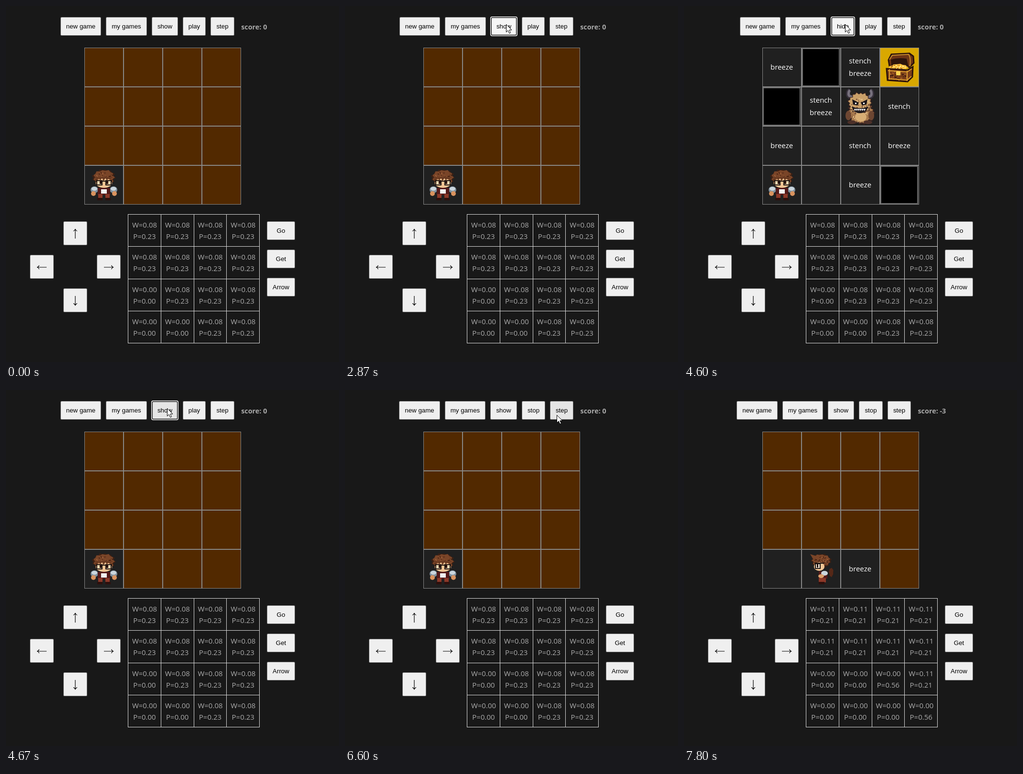
An HTML page with a canvas that plays this animation: 697 by 744 pixels, repeating every 8000 ms.

```html
<!DOCTYPE html>
<html lang="en">
<head>
<meta charset="utf-8">
<title>Cave game</title>
<style>
html, body { margin: 0; height: 100%; overflow: hidden; background: #181818; }
canvas { display: block; }
</style>
</head>
<body>
<canvas id="stage" width="697" height="744"></canvas>
<script>
const ctx = document.getElementById('stage').getContext('2d');
const LOOP = 8000, CELL = 82, BOARD_X = 164, BOARD_Y = 87;
const UI = '13.333px "Liberation Sans", Arial, sans-serif';
const BODY = '15px "Open Sans", "Noto Sans", sans-serif';
const BOLD = 'bold 14.4px "Open Sans", "Noto Sans", sans-serif';

// Drawing helpers
function rect(color, x, y, w, h) {
  ctx.fillStyle = color;
  ctx.fillRect(x, y, w, h);
}
function round(color, x, y, w, h, r) {
  ctx.fillStyle = color;
  ctx.beginPath();
  ctx.roundRect(x, y, w, h, r);
  ctx.fill();
}
function oval(color, x, y, rx, ry) {
  ctx.fillStyle = color;
  ctx.beginPath();
  ctx.ellipse(x, y, rx, ry, 0, 0, Math.PI * 2);
  ctx.fill();
}
function line(d, color, width) {
  ctx.strokeStyle = color;
  ctx.lineWidth = width;
  ctx.stroke(new Path2D(d));
}
function shape(color, d) {
  ctx.fillStyle = color;
  ctx.fill(new Path2D(d));
}
function text(s, x, y, font, color, align = 'center') {
  ctx.font = font;
  ctx.fillStyle = color;
  ctx.textAlign = align;
  ctx.fillText(s, x, y);
}
function at(x, y, paint) {
  ctx.save();
  ctx.translate(x, y);
  paint();
  ctx.restore();
}
function mirrored(axis, paint) {
  for (const side of [1, -1]) at(axis, 0, () => { ctx.scale(side, 1); paint(); });
}
// An oval with a shaggy edge
function fur(color, x, y, rx, ry, tufts) {
  ctx.fillStyle = color;
  ctx.beginPath();
  for (let i = 0; i < tufts * 2; i++) {
    const a = i * Math.PI / tufts, r = (i % 2 ? 0.86 : 1) + 0.05 * Math.sin(i * 5);
    ctx.lineTo(x + rx * r * Math.cos(a), y + ry * r * Math.sin(a));
  }
  ctx.fill();
}
// Seeded two-pixel dots scattered over an oval
function specks(colors, x, y, rx, ry, count) {
  let seed = 7;
  const random = () => (seed = seed * 16807 % 2147483647) / 2147483647;
  random();
  for (let i = 0; i < count; i++) {
    const a = random() * Math.PI * 2, r = Math.sqrt(random());
    rect(colors[i % colors.length], Math.round(x + rx * r * Math.cos(a)), Math.round(y + ry * r * Math.sin(a)), 2, 2);
  }
}

// Sprites, each in a cell
const HAIR = ['#5b2f1b', '#9a5d37', '#4a2413'];
function hair(x, y, rx, ry) {
  fur('#3d2013', x, y, rx, ry, 13);
  fur('#7a4528', x, y - 1, rx - 2, ry - 2, 11);
  specks(HAIR, x, y, rx - 6, ry - 5, 70);
}
function manFront() {
  hair(41, 26, 25, 18);
  oval('#f1c493', 41, 37, 17, 10);
  for (let i = -2; i < 3; i++) shape('#6a3b22', `M${36 + i * 7} 24h10l-6 ${9 - Math.abs(i)}z`);
  mirrored(41, () => {
    rect('#1b1412', 0, 32, 17, 2);
    rect('#1b1412', 3, 31, 13, 11);
    rect('#f8d8b0', 5, 33, 9, 7);
    rect('#2b1712', 5, 32, 4, 7);
    oval('#7f8f9c', 20, 51, 8, 7);
    oval('#cbd6dd', 20, 49, 6, 4);
    oval('#d9935f', 22, 59, 5, 5);
    rect('#541a1a', 0, 47, 13, 15);
    rect('#8c3828', 3, 60, 9, 9);
    rect('#2c100d', 3, 68, 11, 5);
  });
  rect('#f2f2f2', 35, 50, 12, 9);
}
function manSide() {
  fur('#552817', 20, 48, 5, 10, 7);
  hair(41, 24, 22, 15);
  shape('#7a4528', 'M48 15L64 10 56 23Z');
  oval('#f1c493', 45, 36, 11, 9);
  rect('#1b1412', 35, 28, 20, 2);
  rect('#1b1412', 42, 28, 12, 13);
  rect('#eee1cf', 44, 31, 8, 8);
  rect('#25150f', 47, 31, 3, 7);
  rect('#541a1a', 28, 46, 18, 15);
  oval('#cbd6dd', 34, 50, 7, 5);
  oval('#dda06b', 41, 56, 6, 4);
  rect('#8c3828', 31, 60, 15, 9);
  rect('#2c100d', 34, 68, 12, 5);
}
function monster() {
  mirrored(40.5, () => {
    line('M11 23Q26 22 25 14Q25 9 21 7', '#37313b', 9);
    line('M11 22Q25 21 24 14Q24 9 21 7', '#77717d', 5);
  });
  fur('#38221f', 42, 55, 31, 25, 19);
  fur('#a87a4e', 42, 54, 28, 22, 19);
  fur('#38221f', 40, 34, 26, 24, 17);
  fur('#c99f68', 40, 34, 24, 22, 17);
  specks(['#e5c28c', '#8a5f3d', '#6d4632'], 41, 48, 23, 26, 130);
  oval('#d8ae75', 42, 63, 12, 10);
  mirrored(40, () => {
    oval('#6d4632', 24, 60, 6, 10);
    oval('#4c3029', 17, 74, 9, 4);
    shape('#1b1519', 'M2 33L16 26 14 37 5 39Z');
    rect('#fff', 7, 33, 3, 3);
  });
  shape('#1b1519', 'M23 41Q40 48 58 41Q53 55 40 55Q28 55 23 41Z');
  for (let x = 28; x < 52; x += 4) shape('#fff', `M${x} 46h4l-2 5z`);
}
function chest() {
  const lid = 'M18 26L24 14 62 12 70 18 71 32 62 41 20 38Z';
  const box = 'M14 44L58 47 69 40 68 61 58 71 16 68Z';
  rect('#d9a800', 1, 1, 80, 80);
  shape('#6d3516', lid);
  line(lid, '#2b130b', 3);
  shape('#2d150c', 'M23 25Q38 20 56 23L60 40 24 38Z');
  line('M20 25L26 16 60 14Q65 20 63 39', '#c98d2c', 2);
  fur('#ffc23c', 39, 41, 21, 7, 9);
  specks(['#fff0a0', '#a8641b'], 39, 39, 17, 4, 24);
  shape('#7a3e18', box);
  line(box, '#2b130b', 3);
  specks(['#3f1d10', '#a9642b'], 37, 58, 19, 9, 60);
  line('M17 48L57 51 67 44M18 65L57 68 66 60M20 45V67M57 48V70', '#d99c31', 2);
  round('#ffd451', 34, 49, 9, 9, 2);
}

// The cave: signs follow from what lies in the neighbouring cells
const PITS = [[0, 1], [1, 0], [3, 3]], MONSTER = [1, 2], CHEST = [0, 3];
const gap = (a, b) => Math.abs(a[0] - b[0]) + Math.abs(a[1] - b[1]);

function contents(cell) {
  if (PITS.some(p => !gap(p, cell))) {
    rect('#6a6a6a', 1, 1, 79, 80);
    rect('#000', 3, 3, 75, 76);
  } else if (!gap(MONSTER, cell)) monster();
  else if (!gap(CHEST, cell)) chest();
  else {
    const signs = [];
    if (gap(MONSTER, cell) === 1) signs.push('stench');
    if (PITS.some(p => gap(p, cell) === 1)) signs.push('breeze');
    signs.forEach((s, k) => text(s, 40.5, 46 + (k * 2 - signs.length + 1) * 13, BODY, '#fff'));
  }
}

function board(open, reach, manCol, face) {
  for (let i = 0; i < 16; i++) {
    const c = i % 4, r = i >> 2, known = open || (r === 3 && c <= reach);
    at(BOARD_X + c * CELL, BOARD_Y + r * CELL, () => {
      rect('#888', 0, 0, CELL, CELL);
      rect(known ? '#202020' : '#522900', 1, 1, CELL - 2, CELL - 2);
      if (r === 3 && c === manCol) {
        if (face < 0) { ctx.translate(CELL, 0); ctx.scale(-1, 1); }
        (face ? manSide : manFront)();
      } else if (known) contents([r, c]);
    });
  }
}

// Chance of the monster (W) and of a pit (P) in each cell
function table(reach) {
  const near = (r, c) => (r === 3 && c <= reach + 1) || (r === 2 && c <= reach);
  const unknown = 13 - 2 * reach, risk = 0.56;
  const pitChance = (3 - (reach === 2 ? 2 * risk : 0)) / unknown;
  for (let i = 0; i < 5; i++) {
    rect('#ddd', Math.round(255 + i * 68.75), 435, 1, 270);
    rect('#ddd', 255, Math.round(435 + i * 67.3), 276, 1);
  }
  for (let i = 0; i < 16; i++) {
    const c = i % 4, r = i >> 2, x = 290 + c * 68.75, y = Math.round(463 + r * 67.4);
    const w = near(r, c) ? 0 : 1 / unknown;
    const p = !near(r, c) ? pitChance : r === c ? risk : 0;
    text('W=' + w.toFixed(2), x, y, BODY, '#aaa');
    text('P=' + p.toFixed(2), x, y + 24, BODY, '#aaa');
  }
}

function button(x, y, w, h, label, bg = '#efefef', ring) {
  const layer = (color, inset, r) => round(color, x + inset, y + inset, w - 2 * inset, h - 2 * inset, r);
  if (ring) {
    layer('#fff', -1, 4);
    layer('#101010', 0.5, 2.5);
    layer(bg, 2, 1);
  } else {
    layer('#767676', 0, 2.5);
    layer(bg, 1, 1.5);
  }
  if (label) text(label, x + w / 2, y + 24, UI, '#000');
}

function controls() {
  for (let i = 0; i < 4; i++) {
    const angle = i * Math.PI / 2;
    const x = 120 + Math.round(70 * Math.cos(angle)), y = 520 + Math.round(70 * Math.sin(angle));
    button(x, y, 50, 50);
    at(x + 25, y + 26, () => {
      ctx.rotate(angle);
      line('M-10 0H9M5.5 -4Q6.5 -1.5 9.5 0Q6.5 1.5 5.5 4', '#000', 1.2);
    });
  }
  ['Go', 'Get', 'Arrow'].forEach((label, i) => button(546, 450 + i * 59, 59, 39, label));
}

function toolbar(labels, score, cursor, pressed, ring) {
  ctx.font = UI;
  const widths = labels.map(s => ctx.measureText(s).width + 24);
  const total = widths.reduce((a, b) => a + b) + 54.6 + (score ? 61 : 54.8);
  let x = 330.4 - total / 2;
  labels.forEach((label, i) => {
    const left = Math.round(x), w = Math.round(x + widths[i]) - left;
    const over = cursor && cursor[0] >= left && cursor[0] < left + w && cursor[1] >= 23 && cursor[1] < 62;
    button(left, 23, w, 39, label, !over ? '#efefef' : pressed ? '#f5f5f5' : '#e5e5e5', label === ring);
    x += widths[i] + 10;
  });
  text('score: ' + score, x + 4.6, 49, BOLD, '#a9a9a9', 'left');
}

// The pointer is sampled about 15 times a second
const tickOf = (t, from) => Math.floor((t - from) / 65);
const glide = (t, from, n) => Math.min(n, Math.max(0, tickOf(t, from) + 1)) / n;

function cursorAt(t) {
  if (t >= 670 && t < 930) {
    const k = tickOf(t, 670);
    return [678 - 5 * k, Math.round(738 - 7 * Math.sin(k))];
  }
  if (t < 1870 || t >= 6800) return null;
  const k = Math.min(9, tickOf(t, 1870)), leave = glide(t, 6600, 3);
  const x = 334 + 311 * Math.exp(-0.52 * k) + 17 * glide(t, 5330, 2) + 36 * glide(t, 5600, 2) + 160 * leave;
  const y = 37 + 129 * Math.exp(-0.54 * k) + 42 * leave;
  return [Math.round(x), Math.round(y)];
}
function drawCursor([x, y]) {
  const arrow = 'M0 0V16L3.7 12.6 6.4 18.6 9 17.5 6.4 11.6H11.5Z';
  at(x + 0.5, y + 0.5, () => { shape('#fff', arrow); line(arrow, '#000', 1); });
}

function draw(t) {
  const within = (a, b) => t >= a && t < b;
  const open = within(2930, 4670), playing = t >= 6270;
  const moves = [6800, 7270, 7730].filter(m => t >= m).length;
  const reach = Math.min(moves, 2), face = Math.sign(moves) * (moves === 3 ? -1 : 1);
  const pressed = within(2870, 2930) || within(4600, 4670) || within(6200, 6270);
  const toggle = open ? 'hide' : 'show';
  const ring = within(2870, 6200) ? toggle : within(6200, 6270) ? 'play' : '';
  const cursor = cursorAt(t);

  rect('#181818', 0, 0, 697, 744);
  toolbar(['new game', 'my games', toggle, playing ? 'stop' : 'play', 'step'], 0 - moves, cursor, pressed, ring);
  board(open, reach, moves === 3 ? 1 : moves, face);
  controls();
  table(reach);
  if (cursor) drawCursor(cursor);
}

const start = performance.now();
function tick() {
  draw((performance.now() - start) % LOOP);
  requestAnimationFrame(tick);
}
tick();
</script>
</body>
</html>
```
